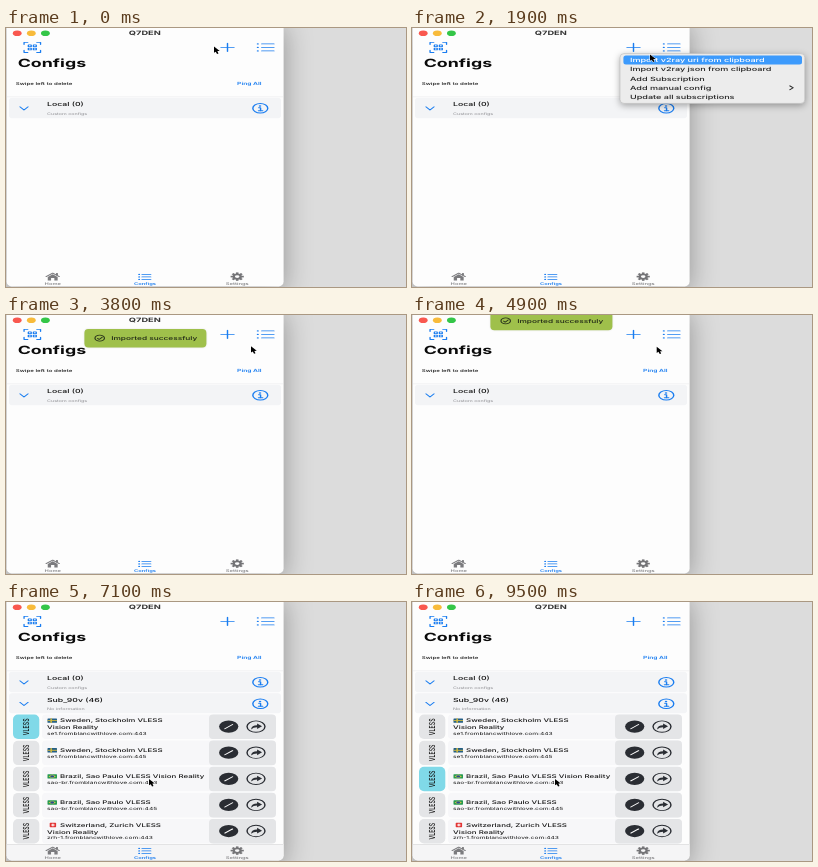
Animation of 400 by 259 pixels, one loop 9.8 s. Source, as an HTML page with a canvas:

```html
<!DOCTYPE html>
<html lang="en">
<head>
<meta charset="utf-8">
<title>Configs</title>
<style>
html, body { margin: 0; width: 100%; height: 100%; overflow: hidden; background: #dcdcdc; }
canvas { display: block; width: 400px; height: 259px; }
</style>
</head>
<body>
<canvas id="stage"></canvas>
<script>
const W = 400, H = 259, LOOP = 9800;
const UX = 0.55, UY = 0.35;            // size of one interface point, wider than tall
const BLUE = '#1a7df0', INK = '#111', GREY = '#8c8c90', DARK = '#2a2d33';
const FONT = 'Inter, "Open Sans", sans-serif';
const TILT = 0.0006;                   // imperceptible turn that keeps tiny glyphs unhinted

const canvas = document.getElementById('stage');
const dpr = window.devicePixelRatio || 1;
canvas.width = W * dpr;
canvas.height = H * dpr;
const c = canvas.getContext('2d');
c.textRendering = 'geometricPrecision';

const clamp = v => Math.max(0, Math.min(1, v));
const span = (t, a, b) => clamp((t - a) / (b - a));
const ease = v => v * v * (3 - 2 * v);

function box(x, y, w, h, r, fill) {
  c.beginPath();
  c.roundRect(x, y, w, h, r);
  c.fillStyle = fill;
  c.fill();
}

function text(s, x, y, size, weight = 500, color = INK, align = 'left', turn = 0) {
  c.save();
  c.translate(x, y);
  c.scale(size / 100, size / 100 * UY / UX);
  c.rotate(turn + TILT);
  c.font = `${weight} 100px ${FONT}`;
  c.textAlign = align;
  c.fillStyle = color;
  c.fillText(s, 0, 36);
  c.restore();
}

// Draws in interface points around (x, y)
function icon(x, y, color, width, draw) {
  c.save();
  c.translate(x, y);
  c.scale(UX, UY);
  c.strokeStyle = c.fillStyle = color;
  c.lineWidth = width;
  c.lineCap = c.lineJoin = 'round';
  draw();
  c.restore();
}

function line(...p) {
  c.beginPath();
  for (let i = 0; i < p.length; i += 2) c.lineTo(p[i], p[i + 1]);
  c.stroke();
}

function poly(...p) {
  c.beginPath();
  for (let i = 0; i < p.length; i += 2) c.lineTo(p[i], p[i + 1]);
  c.closePath();
  c.fill();
}

function disc(x, y, r, stroke) {
  c.beginPath();
  c.arc(x, y, r, 0, Math.PI * 2);
  stroke ? c.stroke() : c.fill();
}

const chevron = (x, y) => icon(x, y, BLUE, 2.3, () => line(-7.5, -4.5, 0, 4.5, 7.5, -4.5));

const info = (x, y) => icon(x, y, BLUE, 2.6, () => {
  disc(0, 0, 13.6, true);
  disc(-0.5, -6.5, 2.3);
  line(-3, -1.5, 0.5, -1.5, 0.5, 7);
  line(-3.5, 7.2, 4.5, 7.2);
});

const list = (x, y, s, width) => icon(x, y, BLUE, width, () => {
  for (const k of [-1, 0, 1]) {
    disc(-14 * s, k * 10 * s, width * 0.75);
    line(-7 * s, k * 10 * s, 15.5 * s, k * 10 * s);
  }
});

const scan = (x, y) => icon(x, y, BLUE, 2.4, () => {
  for (const a of [-1, 1]) for (const b of [-1, 1]) {
    line(a * 15, b * 8, a * 15, b * 14.5, a * 8, b * 14.5);
    c.strokeRect(a * 4.6 - 2.6, b * 4.6 - 2.6, 5.2, 5.2);
  }
});

const house = (x, y) => icon(x, y, '#7b7b7e', 2.4, () => {
  line(-12, 0, 0, -10, 12, 0);
  c.fillRect(6, -10, 3.5, 6);
  poly(-9, 1, 0, -6.5, 9, 1, 9, 11, 3, 11, 3, 4, -3, 4, -3, 11, -9, 11);
});

const gear = (x, y) => icon(x, y, '#747477', 4.6, () => {
  disc(0, 0, 6.4, true);
  c.lineCap = 'butt';
  for (let i = 0; i < 8; i++) {
    const a = i * Math.PI / 4, u = Math.cos(a), v = Math.sin(a);
    line(u * 7, v * 7, u * 12, v * 12);
  }
});

function flag(kind, y) {
  const x = 41.5, t = y - 2.2, h = 4.4;
  if (kind === 'se') {
    box(x, t, 9.5, h, 0.6, '#245f86');
    c.fillStyle = '#d3bb3f';
    c.fillRect(x + 2.9, t, 1.5, h);
    c.fillRect(x, y - 0.45, 9.5, 0.9);
  } else if (kind === 'br') {
    box(x, t, 9.5, h, 0.6, '#259a50');
    c.fillStyle = '#d9cb45';
    poly(x + 1, y, x + 4.75, t + 0.4, x + 8.5, y, x + 4.75, t + h - 0.4);
    icon(x + 4.75, y, '#25508f', 1, () => disc(0, 0, 3.4));
  } else {
    box(x + 2.2, t, 6.4, h, 0.6, '#e23535');
    c.fillStyle = '#fff';
    c.fillRect(x + 4.8, t + 0.9, 1.2, 2.6);
    c.fillRect(x + 3.6, y - 0.45, 3.6, 0.9);
  }
}

function backdrop() {
  c.fillStyle = '#dcdcdc';
  c.fillRect(0, 0, W, H);
  c.save();
  c.shadowColor = 'rgba(0,0,0,.34)';
  c.shadowBlur = 28 * dpr;
  c.shadowOffsetY = 6 * dpr;
  box(0.6, -8, 277, 266.4, 5, '#fdfdfd');
  c.restore();
}

function section(y, h, title, note) {
  box(3, y, 272, h, 3, '#f3f4f6');
  text(title, 41, y + 6.6, 8.7);
  text(note, 41, y + 15.6, 5.4, 400, GREY);
  chevron(18, y + 10.7);
  info(254.3, y + 10.6);
}

const servers = [
  ['se', 'Sweden, Stockholm VLESS', 'Vision Reality', 'se1.fromblancwithlove.com:443'],
  ['se', 'Sweden, Stockholm VLESS', '', 'se1.fromblancwithlove.com:445'],
  ['br', 'Brazil, Sao Paulo VLESS Vision Reality', '', 'sao-br.fromblancwithlove.com:443'],
  ['br', 'Brazil, Sao Paulo VLESS', '', 'sao-br.fromblancwithlove.com:445'],
  ['ch', 'Switzerland, Zurich VLESS', 'Vision Reality', 'zrh-1.fromblancwithlove.com:443']
];

function server([kind, title, more, host], i, active) {
  const y = 124.8 + i * 26.1;
  box(36, y - 12.3, 234, 24.6, 4, '#f7f7f9');
  box(7, y - 12.2, 26.3, 24.4, 5, active ? '#80d9e8' : '#e4e5e7');
  text('VLESS', 20.2, y, 8.3, 500, INK, 'center', -Math.PI / 2);
  box(203, y - 12.3, 67, 24.6, 4, '#e4e5e7');
  const top = more ? y - 6.2 : y - 2.6;
  flag(kind, top);
  text(title, 54, top, 7.95, 500);
  if (more) text(more, 41, y + 0.5, 7.95, 500);
  text(host, 41, more ? y + 6.4 : y + 3.3, 6.65, 400);
  icon(222.7, y - 0.2, DARK, 2.4, () => {
    disc(0, 0, 17.5);
    c.strokeStyle = '#fff';
    line(-7, 6, 7, -6);
  });
  icon(250, y - 0.2, DARK, 2.6, () => {
    disc(0, 0, 16.3, true);
    c.beginPath();
    c.moveTo(-9, 8);
    c.quadraticCurveTo(-8, -4, 2, -4);
    c.lineTo(2, -9);
    c.lineTo(11, -1);
    c.lineTo(2, 7);
    c.lineTo(2, 2);
    c.quadraticCurveTo(-5, 2, -9, 8);
    c.fill();
  });
}

function windowUi(t) {
  ['#f9584f', '#f8bb3b', '#34c648'].forEach((col, i) =>
    icon(11.2 + i * 14.1, 5.2, col, 1, () => disc(0, 0, 8)));
  text('Q7DEN', 138.8, 5.2, 9.3, 700, '#333', 'center');
  scan(26.3, 19.4);
  icon(221.5, 19.4, BLUE, 2.6, () => { line(-12, 0, 12, 0); line(0, -12, 0, 12); });
  list(259.5, 19.4, 1, 2.6);
  text('Configs', 11.7, 35.2, 17.8, 700, '#0a0a0a');
  text('Swipe left to delete', 9.7, 55.9, 6.2, 500);
  text('Ping All', 255.5, 55.9, 6.7, 600, BLUE, 'right');
  c.fillStyle = '#e9e9ea';
  c.fillRect(1, 68.6, 276, 0.6);
  section(69.7, 20.6, 'Local (0)', 'Custom configs');

  const shown = ease(span(t, 4950, 5250));
  if (shown > 0) {
    c.save();
    c.globalAlpha = shown;
    c.beginPath();
    c.rect(1, 90, 276, 152.3);
    c.clip();
    section(91.2, 20, 'Sub_90v (46)', 'No information');
    const chosen = t < 7250 ? 0 : 2;
    servers.forEach((s, i) => server(s, i, i === chosen));
    c.restore();
    c.globalAlpha = shown;
    box(0.8, 242.3, 276.6, 16, [0, 0, 5, 5], '#f5f5f6');
    c.fillStyle = '#cfcfd1';
    c.fillRect(1, 242.1, 276, 0.5);
    c.globalAlpha = 1;
  }
  house(46.7, 248.6);
  list(138.7, 248.9, 0.72, 2.4);
  gear(231.2, 248.6);
  text('Home', 46.8, 256.1, 5.8, 500, '#7b7b7e', 'center');
  text('Configs', 139, 256.1, 5.8, 600, BLUE, 'center');
  text('Settings', 231.2, 256.1, 5.9, 500, '#7b7b7e', 'center');
}

function toast(t, from, to, x, w, label, ringed) {
  const show = ease(span(t, from, from + 300)) * (1 - ease(span(t, to, to + 200)));
  if (show <= 0) return;
  c.save();
  c.translate(0, (show - 1) * 34);
  c.shadowColor = 'rgba(0,0,0,.12)';
  c.shadowBlur = 2 * dpr;
  box(x, 14, w, 18.6, 4, '#9fc04b');
  c.shadowColor = 'transparent';
  icon(x + 15.3, 23.2, '#26301a', 2.1, () => {
    if (ringed) {
      disc(0, 0, 8.6, true);
      line(-4, 0.3, -1, 3.5, 4.5, -3);
    } else {
      line(-8, 0.5, -3, 6.5, 8, -6.5);
    }
  });
  text(label, x + 26.8, 23.2, 8.3, 500, '#1d2415');
  c.restore();
}

function menu(t) {
  const show = span(t, 800, 900) * (1 - span(t, 2700, 2900));
  if (show <= 0) return;
  c.save();
  c.globalAlpha = show;
  c.shadowColor = 'rgba(0,0,0,.35)';
  c.shadowBlur = 7 * dpr;
  c.shadowOffsetY = 2 * dpr;
  box(208, 25.6, 184.8, 49.8, 4, '#ececec');
  c.shadowColor = 'transparent';
  c.strokeStyle = '#bcbcbc';
  c.lineWidth = 0.6;
  c.stroke();
  const lit = t >= 1750 && !(t >= 2500 && t < 2600);
  if (lit) box(211.4, 27.5, 178.6, 9, 2.5, '#3c9afc');
  ['Import v2ray uri from clipboard', 'Import v2ray json from clipboard', 'Add Subscription',
    'Add manual config', 'Update all subscriptions'].forEach((s, i) =>
    text(s, 218, 32 + i * 9.3, 9.05, 500, lit && !i ? '#fff' : '#222'));
  icon(379.5, 59.8, '#222', 2.4, () => line(-3, -5.5, 3, 0, -3, 5.5));
  c.restore();
}

// time, x, y of the pointer tip
const path = [
  [0, 208, 18.5], [100, 208, 18.5], [600, 221, 18.5], [1650, 221, 18.5], [1900, 238, 26.5],
  [2700, 238, 26.5], [3500, 245, 31.3], [4800, 245, 31.3], [5400, 241, 35.8], [5700, 241, 35.8],
  [6600, 143.5, 176], [6900, 143, 177], [LOOP, 143, 177]
];

function pointer(t) {
  const i = path.findIndex(p => p[0] > t);
  const [t0, x0, y0] = path[i - 1], [t1, x1, y1] = path[i];
  const k = ease(span(t, t0, t1));
  c.save();
  c.translate(x0 + (x1 - x0) * k, y0 + (y1 - y0) * k);
  c.scale(0.9, 0.9);
  c.beginPath();
  [0, 0, 0, 7, 1.9, 5.7, 3.4, 8.2, 5, 7.7, 3.7, 5.1, 6.4, 5].forEach((v, j, a) => {
    if (j % 2) c.lineTo(a[j - 1], v);
  });
  c.closePath();
  c.lineWidth = 1;
  c.lineJoin = 'round';
  c.strokeStyle = '#fff';
  c.stroke();
  c.fillStyle = '#000';
  c.fill();
  c.restore();
}

function draw(now) {
  const t = now % LOOP;
  c.setTransform(dpr, 0, 0, dpr, 0, 0);
  backdrop();
  windowUi(t);
  toast(t, 3000, 4800, 78.4, 122, 'Imported successfuly', true);
  toast(t, 7300, 9300, 88, 102.6, 'Server Changed!', false);
  menu(t);
  pointer(t);
  requestAnimationFrame(() => draw(performance.now() - start));
}

const start = performance.now();
draw(0);
</script>
</body>
</html>
```
